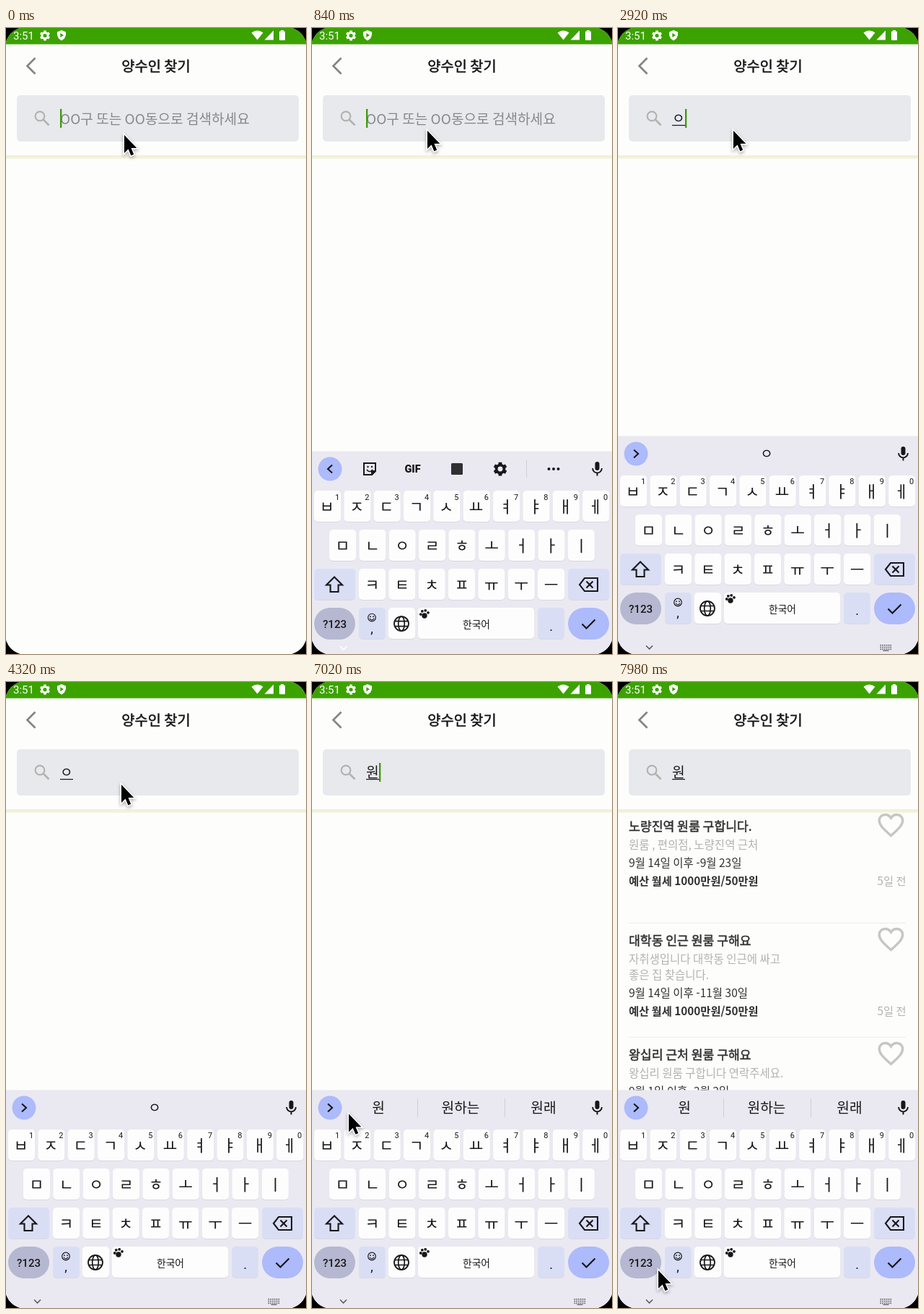
These frames come from a looping animation (416 by 866 pixels, 8 s). An HTML page with a canvas:

```html
<!DOCTYPE html>
<html lang="ko">
<head>
<meta charset="utf-8">
<title>양수인 찾기</title>
<style>
  html, body { margin: 0; width: 100%; height: 100%; overflow: hidden; background: #000; }
  canvas { display: block; width: 416px; height: 866px; }
</style>
</head>
<body>
<canvas id="stage" width="416" height="866"></canvas>
<script>
const ctx = document.getElementById('stage').getContext('2d');
const LOOP = 8000;
const KOREAN = '"Noto Sans CJK KR", "Noto Sans CJK", "Noto Sans KR", sans-serif';
const LATIN = 'Roboto, sans-serif';
const C = {
  page: '#fdfdfc', field: '#e7e9ed', panel: '#eae9f1', key: '#fdfdfd', shade: '#d9d8e2',
  grey: '#dadef5', pill: '#b5b8d0', purple: '#adbafb', ink: '#17171a', dark: '#303032',
  green: '#3ca200', caret: '#3f9a08', hint: '#88888a', faint: '#b2b2b0', soft: '#c6c6c2',
  line: '#cfced4', rule: '#f2f2d6'
};
const TAU = Math.PI * 2;

// Times of the state changes, in ms
const KEYBOARD_IN = 500, KEYBOARD_DONE = 1080, SUGGEST = 1620, RESULTS = 7560;
const TYPED = [
  [1690, 'ㅇ'], [4700, '우'], [5200, '워'], [5640, '원']
];
const SUGGESTIONS = {
  'ㅇ': ['', 'ㅇ', ''], '우': ['우', '우리', '우선'],
  '워': ['워', '워낙', '워크'], '원': ['원', '원하는', '원래']
};
const ITEMS = [
  ['노량진역 원룸 구합니다.', ['원룸 , 편의점, 노량진역 근처'], '9월 14일 이후 -9월 23일'],
  ['대학동 인근 원룸 구해요', ['자취생입니다 대학동 인근에 싸고', '좋은 집 찾습니다.'], '9월 14일 이후 -11월 30일'],
  ['왕십리 근처 원룸 구해요', ['왕십리 원룸 구합니다 연락주세요.'], '9월 1일 이후 -2월 2일']
];
const HEART = new Path2D('M12 20.2C5 14 3 11.6 3 8.5C3 5.9 5 4 7.5 4C9.3 4 11 5 12 6.6C13 5 14.7 4 16.5 4C19 4 21 5.9 21 8.5C21 11.6 19 14 12 20.2Z');
const ARROW = new Path2D('M0 0V25L5.6 19.6L9.4 28.4L13.2 26.7L9.5 18.1H17.3Z');

const clamp = v => Math.max(0, Math.min(1, v));
const smooth = v => v * v * (3 - 2 * v);
const easeIn = v => v ** 1.6;
const easeOut = v => 1 - (1 - v) ** 2;

// Start time, end time, easing and the point reached
const MOVES = [
  [100, 600, smooth, 160, 142],
  [6200, 7020, easeIn, 51, 597],
  [7020, 8000, easeOut, 56, 814]
];

function text(s, x, cy, size, color = C.ink, weight = 400, align = 'left', font = KOREAN) {
  ctx.font = `${weight} ${size}px ${font}`;
  ctx.textAlign = align;
  ctx.fillStyle = color;
  const y = cy + size * (font === LATIN ? 0.36 : 0.38);
  ctx.fillText(s, x, y);
  if (weight === 500 && font === KOREAN) {
    // Thicken the regular face to a medium weight
    ctx.strokeStyle = color;
    ctx.lineWidth = 0.5;
    ctx.strokeText(s, x, y);
  }
}

function box(x, y, w, h, r, color) {
  ctx.fillStyle = color;
  ctx.beginPath();
  ctx.roundRect(x, y, w, h, r);
  ctx.fill();
}

function disc(x, y, r, color) {
  ctx.fillStyle = color;
  ctx.beginPath();
  ctx.arc(x, y, r, 0, TAU);
  ctx.fill();
}

function ring(x, y, r, color, width, rx = r) {
  ctx.strokeStyle = color;
  ctx.lineWidth = width;
  ctx.beginPath();
  ctx.ellipse(x, y, rx, r, 0, 0, TAU);
  ctx.stroke();
}

function trace(points) {
  ctx.beginPath();
  for (let i = 0; i < points.length; i += 2) ctx.lineTo(points[i], points[i + 1]);
}

function poly(points, color) {
  trace(points);
  ctx.fillStyle = color;
  ctx.fill();
}

function stroke(points, color, width, closed) {
  trace(points);
  if (closed) ctx.closePath();
  ctx.strokeStyle = color;
  ctx.lineWidth = width;
  ctx.stroke();
}

function gear(x, y, r, color) {
  ctx.beginPath();
  for (let i = 0; i < 6; i++) {
    for (const [turn, k] of [[-0.36, 0.76], [-0.24, 1], [0.24, 1], [0.36, 0.76]]) {
      const a = i * TAU / 6 + turn + Math.PI / 2;
      ctx.lineTo(x + Math.cos(a) * r * k, y + Math.sin(a) * r * k);
    }
  }
  ctx.closePath();
  ctx.moveTo(x + r * 0.36, y);
  ctx.arc(x, y, r * 0.36, 0, TAU);
  ctx.fillStyle = color;
  ctx.fill('evenodd');
}

function statusBar() {
  ctx.fillStyle = C.green;
  ctx.fillRect(0, 0, 416, 22.5);
  const w = '#fff';
  text('3:51', 10, 10.5, 15, w, 400, 'left', LATIN);
  gear(54, 10.5, 7.2, w);
  poly([77, 3, 83, 5.5, 83, 10, 81, 14.5, 77, 17.5, 73, 14.5, 71, 10, 71, 5.5], w);
  poly([75.3, 7, 80, 10, 75.3, 13], C.green);
  ctx.beginPath();
  ctx.moveTo(348.5, 16.5);
  ctx.lineTo(340.5, 6.6);
  ctx.quadraticCurveTo(348.5, 0.2, 356.5, 6.6);
  ctx.fillStyle = w;
  ctx.fill();
  poly([358.5, 16.5, 371, 3.5, 371, 16.5], w);
  box(379, 4.5, 8, 12.5, 1, w);
  box(381, 3, 4, 3, 0, w);
}

function caretOn(t) {
  if (t >= RESULTS) return false;
  const start = [-50, 700, ...TYPED.map(e => e[0])].filter(s => s <= t).pop();
  return (t - start) % 1000 < 500;
}

function header(t, word) {
  statusBar();
  stroke([40.5, 41.5, 29.5, 52.5, 40.5, 63.5], '#85857c', 2.7);
  text('양수인 찾기', 208, 52.5, 19.8, C.ink, 500, 'center');
  box(15, 93, 391, 64, 5, C.field);
  ring(47, 122, 6.4, C.faint, 2.1);
  stroke([51.5, 126.5, 59.5, 134.5], C.faint, 2.6);
  if (word) {
    text(word, 75, 125, 19.2, C.ink, 300);
    ctx.fillStyle = C.ink;
    ctx.fillRect(75, 134, 18, 1.2);
  } else {
    text('OO구 또는 OO동으로 검색하세요', 75, 125.5, 19.1, C.hint, 300);
  }
  if (caretOn(t)) {
    ctx.fillStyle = C.caret;
    ctx.fillRect(word ? 93 : 75, 112, 2.3, 26);
  }
  ctx.fillStyle = C.rule;
  ctx.fillRect(0, 176, 416, 4.5);
}

function results() {
  ITEMS.forEach(([title, about, dates], i) => {
    const y = 199 + 158 * i, low = (about.length - 1) * 22;
    text(title, 15, y, 17.2, C.dark, 500);
    about.forEach((s, n) => text(s, 15, y + 26 + n * 22, 15.5, C.faint));
    text(dates, 15, y + 51 + low, 15.5, C.dark);
    text('예산 월세 1000만원/50만원', 15, y + 76 + low, 15.3, C.dark, 700);
    text('5일 전', 399.5, y + 76 + low, 15.3, C.faint, 400, 'right');
    ctx.fillStyle = '#ececea';
    ctx.fillRect(15, y + 134, 384, 1);
    ctx.save();
    ctx.translate(378.5 - 12 * 1.8, y - 1 - 12.1 * 1.8);
    ctx.scale(1.8, 1.8);
    ctx.strokeStyle = C.soft;
    ctx.lineWidth = 1.9;
    ctx.stroke(HEART);
    ctx.restore();
  });
}

function mic(x, y) {
  box(x - 3, y - 10, 6, 12, 3, C.ink);
  ctx.strokeStyle = C.ink;
  ctx.lineWidth = 1.9;
  ctx.beginPath();
  ctx.arc(x, y - 1, 6.4, 0, Math.PI);
  ctx.stroke();
  stroke([x, y + 5, x, y + 9.5], C.ink, 2);
}

function smile(x, y, r, width) {
  ring(x, y, r, C.ink, width);
  disc(x - r * 0.38, y - r * 0.25, r * 0.17, C.ink);
  disc(x + r * 0.38, y - r * 0.25, r * 0.17, C.ink);
  ctx.beginPath();
  ctx.arc(x, y + r * 0.08, r * 0.55, 0.2, Math.PI - 0.2);
  ctx.stroke();
}

function toolbar(words) {
  const y = 589, d = words ? 3 : -3;
  disc(25, y, 16.5, C.purple);
  stroke([25 - d, y - 5.5, 25 + d, y, 25 - d, y + 5.5], C.ink, 2.1);
  mic(395.5, y);
  if (words) {
    words.forEach((s, i) => text(s, [92, 206, 321][i], y, 19.2, C.ink, 400, 'center'));
    ctx.fillStyle = C.line;
    if (words[0]) [146, 267].forEach(x => ctx.fillRect(x, y - 13, 1, 26));
    return;
  }
  stroke([72, y - 8, 88, y - 8, 88, y + 3, 83, y + 8, 72, y + 8], C.ink, 2, true);
  poly([88, y + 2, 82, y + 2, 82, y + 8], C.ink);
  disc(77.5, y - 3, 1.2, C.ink);
  disc(83, y - 3, 1.2, C.ink);
  ctx.lineWidth = 1.5;
  ctx.beginPath();
  ctx.arc(80, y - 0.5, 4, 0.3, Math.PI - 0.3);
  ctx.stroke();
  text('GIF', 139.5, y, 14.5, C.ink, 900, 'center', LATIN);
  box(193, y - 8, 16, 16, 1.5, C.dark);
  gear(261, y, 9.6, C.ink);
  ctx.fillStyle = C.line;
  ctx.fillRect(297, y - 12, 1, 24);
  [-6.5, 0, 6.5].forEach(dx => disc(335 + dx, y, 2, C.ink));
}

function key(x, y, w, color = C.key, r = 5) {
  box(x, y + 1, w, 43, r, C.shade);
  box(x, y, w, 43, r, color);
}

function keys() {
  const step = 41.35;
  const row = (letters, x0, y, shift = 0) => [...letters].forEach((s, i) => {
    const x = x0 + step * i;
    key(x, y, 37);
    text(s, x + 18.5 + shift, y + 21.5, 21.5, C.ink, 400, 'center');
  });
  row('ㅂㅈㄷㄱㅅㅛㅕㅑㅐㅔ', 3, 619, -0.8);
  for (let i = 0; i < 10; i++) {
    text(String((i + 1) % 10), 35 + step * i, 627.5, 11, C.ink, 400, 'center', LATIN);
  }
  row('ㅁㄴㅇㄹㅎㅗㅓㅏㅣ', 24, 673);
  row('ㅋㅌㅊㅍㅠㅜㅡ', 65, 727);

  key(3, 727, 57, C.grey);
  stroke([31, 738.5, 42, 749.5, 36.5, 749.5, 36.5, 759, 25.5, 759, 25.5, 749.5, 20, 749.5], C.ink, 2.1, true);
  key(355, 727, 57, C.grey);
  stroke([371, 749, 378, 740, 396, 740, 396, 758, 378, 758], C.ink, 2.1, true);
  stroke([380.5, 744.5, 389.5, 753.5], C.ink, 2.1);
  stroke([389.5, 744.5, 380.5, 753.5], C.ink, 2.1);

  box(3, 781, 57, 44, 22, C.pill);
  text('?123', 31.5, 803.5, 15, C.ink, 500, 'center', LATIN);
  key(65, 781, 37, C.grey);
  smile(83, 794.5, 5.3, 1.2);
  text(',', 83, 809, 18, C.ink, 400, 'center', LATIN);
  key(106, 781, 37);
  ring(124, 803, 10, C.ink, 1.8);
  ring(124, 803, 10, C.ink, 1.7, 4.3);
  stroke([115, 799.5, 133, 799.5], C.ink, 1.7);
  stroke([115, 806.5, 133, 806.5], C.ink, 1.7);
  key(147, 781, 161);
  text('한국어', 228, 803.5, 13.8, C.ink, 400, 'center');
  disc(156, 792, 3.7, C.ink);
  for (const [x, y] of [[150.8, 790], [152.8, 785.8], [157.2, 784.8], [161, 787.8]]) disc(x, y, 1.9, C.ink);
  key(313, 781, 37, C.grey);
  text('.', 331.5, 806, 18, C.ink, 400, 'center', LATIN);
  box(355, 781, 57, 44, 22, C.purple);
  stroke([374.5, 803.5, 380.5, 809.5, 392.5, 797.5], C.ink, 2.2);
}

function navIcons(t) {
  const dark = clamp((t - 1580) / 400);
  ctx.save();
  ctx.globalAlpha = (1 - dark) * clamp((t - 700) / 140);
  stroke([39, 855.5, 43.5, 860, 48, 855.5], '#fff', 1.6);
  ctx.globalAlpha = dark;
  const ink = '#5c5c60';
  stroke([39, 854.5, 43.5, 859, 48, 854.5], ink, 1.6);
  ctx.fillStyle = ink;
  for (let r = 0; r < 3; r++) {
    for (let i = 0; i < 6; i++) ctx.fillRect(363.5 + i * 2.8, 853 + r * 2.8, 1.6, 1.6);
  }
  ctx.fillRect(367.5, 860.8, 8, 1.2);
  ctx.restore();
}

function keyboard(t, word) {
  if (t < KEYBOARD_IN) return;
  const left = 1 - clamp((t - KEYBOARD_IN) / (KEYBOARD_DONE - KEYBOARD_IN));
  ctx.save();
  ctx.translate(0, 301 * left ** 3);
  ctx.fillStyle = C.panel;
  ctx.fillRect(0, 564.5, 416, 320);
  toolbar(t >= SUGGEST ? SUGGESTIONS[word || 'ㅇ'] : null);
  keys();
  ctx.restore();
  navIcons(t);
}

function pointer(t) {
  let x = 164, y = 148;
  for (const [from, to, ease, x1, y1] of MOVES) {
    const k = ease(clamp((t - from) / (to - from)));
    x += (x1 - x) * k;
    y += (y1 - y) * k;
  }
  ctx.save();
  ctx.translate(x, y);
  ctx.shadowColor = 'rgba(40,40,40,.4)';
  ctx.shadowBlur = 4;
  ctx.shadowOffsetY = 2;
  ctx.strokeStyle = '#fff';
  ctx.lineWidth = 3;
  ctx.stroke(ARROW);
  ctx.shadowColor = 'transparent';
  ctx.fillStyle = '#000';
  ctx.fill(ARROW);
  ctx.restore();
}

function draw(t) {
  const typed = TYPED.filter(e => e[0] <= t).pop();
  const word = typed ? typed[1] : '';
  ctx.fillStyle = '#000';
  ctx.fillRect(0, 0, 416, 866);
  ctx.save();
  ctx.beginPath();
  ctx.roundRect(-1, -1, 418, 868, 28);
  ctx.clip();
  ctx.fillStyle = C.page;
  ctx.fillRect(0, 0, 416, 866);
  if (t >= RESULTS) results();
  header(t, word);
  keyboard(t, word);
  ctx.restore();
  pointer(t);
}

const begin = performance.now();
function tick() {
  draw((performance.now() - begin) % LOOP);
  requestAnimationFrame(tick);
}
tick();
</script>
</body>
</html>
```
